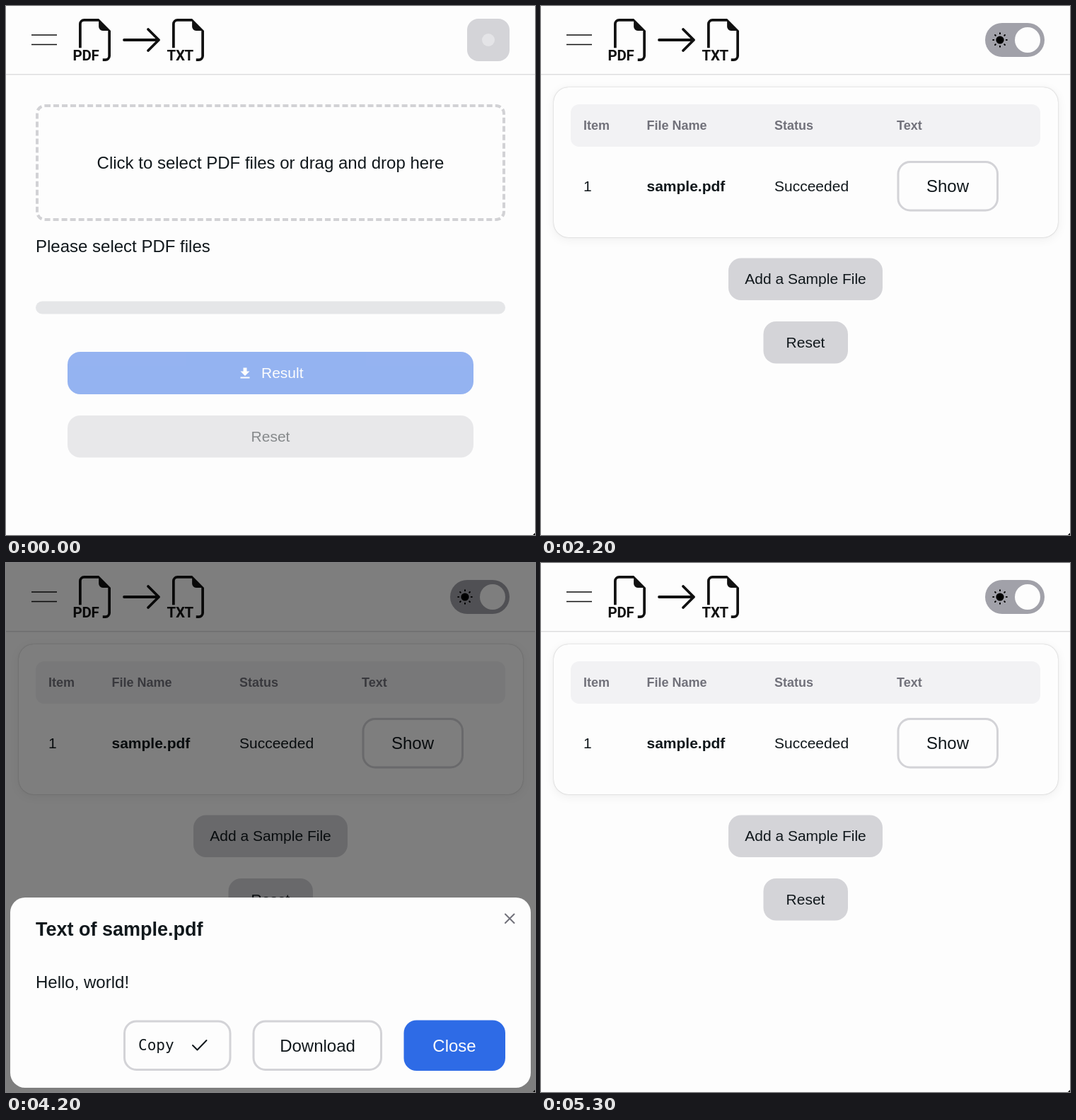
An HTML page that plays this animation: 748 by 748 pixels, repeating every 5400 ms.

```html
<!DOCTYPE html>
<html lang="en">
<head>
<meta charset="utf-8">
<title>PDF to text</title>
<style>
  html, body { margin: 0; width: 100%; height: 100%; overflow: hidden; background: #fdfdfd; }
  #drop, #card, svg { position: absolute; box-sizing: border-box; }
  #drop { left: 42px; top: 139px; width: 664px; height: 165px; border: 4px dashed #d2d2d5; border-radius: 13px; }
  #card { left: 17.5px; top: 114.5px; width: 713px; height: 212px; border-radius: 21px;
    box-shadow: 0 0 7px #00000005, 0 3px 15px #0000000f, 0 0 1.5px #0000004d; }
  svg { left: 0; top: 0; }
  text { font: 24px "Liberation Sans", Arial, sans-serif; fill: #11181c; }
  .s { font-size: 21px; }
  .m { text-anchor: middle; }
  .b { font-weight: bold; }
  .head text { font-size: 18px; font-weight: bold; fill: #71717a; }
  .logo text { font: bold 20.5px Roboto, sans-serif; letter-spacing: -.3px; fill: #111; }
  .mono { font: 21px "DejaVu Sans Mono", monospace; }
  .line { fill: none; stroke: #11181c; stroke-width: 2; stroke-linecap: round; stroke-linejoin: round; }
  .edge { fill: none; stroke: #d3d3d7; stroke-width: 3; }
  .gray { fill: #d4d4d8; }
  .blue { fill: #2e6be6; }
  .white { fill: #fdfdfd; }
</style>
</head>
<body>
<div id="drop"></div>
<div id="card"></div>
<svg width="748" height="748" viewBox="0 0 748 748">
  <defs>
    <path id="page" transform="scale(3.75)" fill="#111" d="M14 4.5V14a2 2 0 0 1-2 2h-1v-1h1a1 1 0 0 0 1-1V4.5h-2A1.5 1.5 0 0 1 9.5 3V1H4a1 1 0 0 0-1 1v9H2V2a2 2 0 0 1 2-2h5.5z"/>
  </defs>

  <g class="logo">
    <path d="M0 96.75H748" stroke="#dededf" stroke-width="1.5"/>
    <path d="M36 41H72M36 54.5H72" stroke="#111" stroke-width="1.6"/>
    <use href="#page" x="0" y="0" transform="translate(95.5 18)"/>
    <use href="#page" x="0" y="0" transform="translate(227.5 18)"/>
    <text x="94.5" y="77">PDF</text>
    <text x="227.5" y="77">TXT</text>
    <path class="line" style="stroke:#111;stroke-width:3.8" d="M167 48H216M201 33L216 48L201 63"/>
  </g>

  <g id="skeleton">
    <rect class="gray" x="652" y="18" width="60" height="60" rx="16"/>
    <circle cx="682" cy="48" r="9" fill="#e4e4e7"/>
  </g>
  <g id="toggle">
    <rect x="628" y="24" width="84" height="48" rx="24" fill="#a1a1a9"/>
    <circle class="white" cx="688" cy="48" r="18"/>
    <circle cx="649" cy="48" r="5.6"/>
    <path id="rays" class="line" style="stroke:#000"/>
  </g>

  <g id="upload">
    <rect id="ring" x="43.5" y="140.5" width="661" height="161.5" rx="12" fill="none" stroke="#e09a35" stroke-width="3"/>
    <text class="m" x="374" y="229.5">Click to select PDF files or drag and drop here</text>
    <text id="chosen" x="42" y="348"></text>
    <text id="state" x="42" y="402">Completed</text>
    <rect x="42" y="417.5" width="664" height="18" rx="9" fill="#e5e6e8"/>
    <rect id="bar" class="blue" x="42" y="417.5" height="18" rx="9"/>
    <g id="buttons">
      <rect class="blue" x="87" y="489" width="574" height="60" rx="18"/>
      <path class="white" d="M335.5 511.5h5v5h4l-6.5 6.5-6.5-6.5h4zM331.5 524.5h13v2h-13z"/>
      <text class="s white" style="fill:#fdfdfd" x="361" y="526">Result</text>
      <rect class="gray" x="87" y="579" width="574" height="59.5" rx="18"/>
      <text class="s m" x="374" y="616">Reset</text>
    </g>
  </g>

  <g id="results">
    <g class="head">
      <rect x="42" y="139" width="664" height="60" rx="12" fill="#f2f2f4"/>
      <text x="60" y="175">Item</text>
      <text x="149.5" y="175">File Name</text>
      <text x="330" y="175">Status</text>
      <text x="503" y="175">Text</text>
    </g>
    <text class="s" x="60" y="261.5">1</text>
    <text class="s b" x="149.5" y="261.5">sample.pdf</text>
    <text class="s" x="330" y="261.5">Succeeded</text>
    <rect class="edge" x="505" y="220.5" width="140.5" height="68.5" rx="17"/>
    <text class="m" x="575" y="262.5">Show</text>
    <rect class="gray" x="265" y="356.5" width="218" height="59.5" rx="18"/>
    <text class="s m" x="374" y="393">Add a Sample File</text>
    <rect class="gray" x="314.5" y="446" width="119.5" height="59.5" rx="18"/>
    <text class="s m" x="374" y="483">Reset</text>
  </g>

  <rect id="shade" width="748" height="748"/>

  <g id="dialog">
    <rect class="white" x="6" y="473" width="736" height="269" rx="21"/>
    <path class="line" style="stroke:#71717a" d="M706 496.5l12.5 12.5m0-12.5l-12.5 12.5"/>
    <text class="b" style="font-size:27px" x="42" y="526.5">Text of sample.pdf</text>
    <text x="42" y="601">Hello, world!</text>
    <rect class="edge" x="167.5" y="648" width="149.5" height="68.5" rx="17"/>
    <text class="mono" x="187" y="689">Copy</text>
    <path id="icon" class="line"/>
    <rect class="edge" x="350" y="648" width="180.5" height="68.5" rx="17"/>
    <text class="m" x="440.5" y="690.5">Download</text>
    <rect class="blue" x="562.5" y="646.5" width="143.5" height="71.5" rx="18"/>
    <text class="m" style="fill:#fdfdfd" x="634" y="690.5">Close</text>
  </g>

  <circle id="tap" r="22" fill-opacity=".3"/>
  <path d="M748 745v3h-3z"/>
</svg>
<script>
const LOOP = 5400, STEP = 100;
const $ = id => document.getElementById(id);
const show = (id, on) => $(id).style.display = on ? '' : 'none';
const ramp = (t, from, length) => Math.min(1, Math.max(0, (t - from) / length));

const COPY = 'M266.5 679h8a4 4 0 0 1 4 4v7.500a4 4 0 0 1-4 4h-8a4 4 0 0 1-4-4v-7.500a4 4 0 0 1 4-4z' +
  'M268.500 679v-3a4 4 0 0 1 4-4h8.500a4 4 0 0 1 4 4v8a4 4 0 0 1-4 4h-2.500';
const CHECK = 'M264 682l6.500 6.500L283.500 675';

// start, end, x, y of each touch
const TAPS = [[2000, 2200, 374, 519], [2900, 3000, 578, 257], [4000, 4100, 272, 682]];

let rays = '';
for (let i = 0; i < 8; i++) {
  const c = Math.cos(i * Math.PI / 4), s = Math.sin(i * Math.PI / 4);
  rays += `M${649 + 8.8 * c} ${48 + 8.8 * s}L${649 + 9.8 * c} ${48 + 9.8 * s}`;
}
$('rays').setAttribute('d', rays);

function draw(t) {
  const table = t >= 2200;
  show('skeleton', t < 100);
  show('toggle', t >= 100);
  show('drop', !table);
  show('upload', !table);
  show('card', table);
  show('results', table);

  const progress = ramp(t, 600, 500);
  show('ring', t >= 600 && t < 2000);
  show('state', progress === 1);
  show('bar', progress > 0);
  $('chosen').textContent = t < 600 ? 'Please select PDF files' : 'Selected sample.pdf';
  $('bar').setAttribute('width', 664 * progress);
  $('buttons').style.opacity = .5 + .5 * ramp(t, 1000, 200);

  // the sheet settles like a critically damped spring and leaves evenly
  const leave = ramp(t, 4900, 300);
  const seen = ramp(t, 2825, 350) * (1 - leave);
  const k = Math.max(0, t - 2825) * .0153;
  const drop = 160 * (1 + k) * Math.exp(-k) + 130 * leave;
  $('shade').style.opacity = seen / 2;
  $('dialog').style.opacity = seen;
  $('dialog').setAttribute('transform', `translate(0 ${drop})`);
  $('icon').setAttribute('d', t < 4100 ? COPY : CHECK);

  const tap = TAPS.find(([from, to]) => t >= from && t < to);
  show('tap', tap);
  if (tap) $('tap').setAttribute('transform', `translate(${tap[2]} ${tap[3]})`);
}

function tick() {
  draw(Math.floor(performance.now() % LOOP / STEP) * STEP);
  requestAnimationFrame(tick);
}
tick();
</script>
</body>
</html>
```
